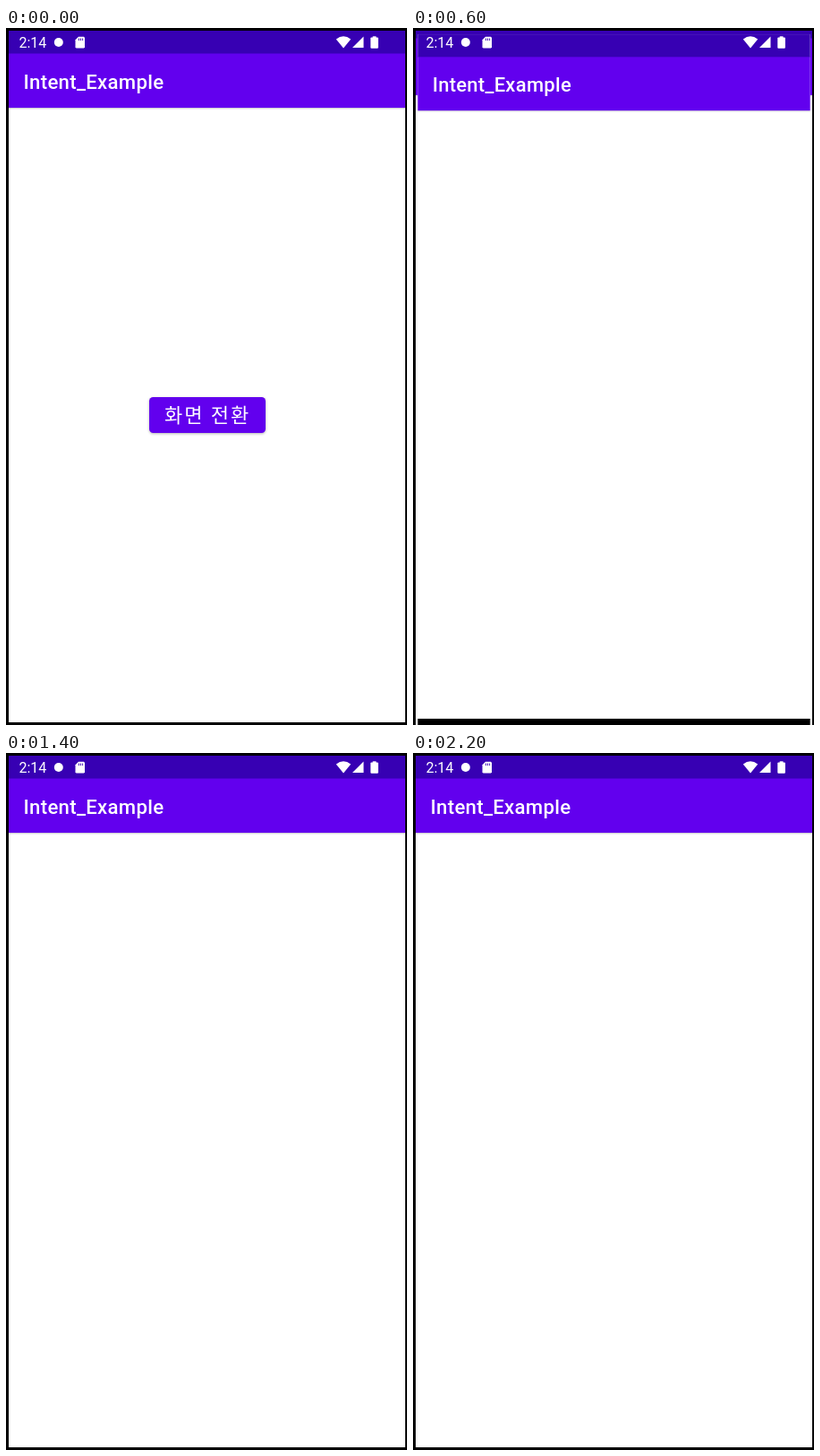
Animation of 448x778 px, one loop 2.3 s. Source, as an HTML page with a canvas:

```html
<!DOCTYPE html>
<html lang="ko">
<head>
<meta charset="utf-8">
<title>Intent_Example</title>
<style>
html, body { margin: 0; width: 100%; height: 100%; overflow: hidden; background: #000; }
canvas { display: block; }
</style>
</head>
<body>
<canvas id="stage" width="448" height="778"></canvas>
<script>
const W = 448, H = 778, LOOP = 2300, STEP = 100;
const PRESS = 400, OPEN = 500, SETTLED = 900;
const PURPLE = '#6200ee', DARK = '#3700b3';
const CENTER = { x: 224.5, y: 391 };

const ctx = document.getElementById('stage').getContext('2d');
const layer = document.createElement('canvas');
layer.width = W;
layer.height = H;
const layerCtx = layer.getContext('2d');

function rect(c, color, x, y, w, h) {
  c.fillStyle = color;
  c.fillRect(x, y, w, h);
}

function polygon(c, points) {
  c.beginPath();
  points.forEach(([x, y]) => c.lineTo(x, y));
  c.closePath();
  c.fill();
}

function roundRect(c, x, y, w, h, r) {
  c.beginPath();
  c.roundRect(x, y, w, h, r);
  c.fill();
}

function text(c, str, x, y, font, spacing) {
  c.font = font;
  c.letterSpacing = spacing + 'px';
  c.fillStyle = '#fff';
  c.fillText(str, x, y);
}

function drawButton(c, pressed) {
  c.save();
  c.shadowColor = pressed ? 'rgba(0,0,0,.38)' : 'rgba(0,0,0,.3)';
  c.shadowBlur = pressed ? 4 : 3;
  c.shadowOffsetY = pressed ? 1.5 : 1;
  c.fillStyle = PURPLE;
  roundRect(c, 160, 412, 130, 40, 4.5);
  c.restore();
  text(c, '화면 전환', 177, 440.3, '22px "Noto Sans CJK KR", "Noto Sans CJK", sans-serif', 2.1);
}

function drawScreen(c, scale, hasButton, pressed) {
  c.save();
  c.translate(CENTER.x, CENTER.y);
  c.scale(scale, scale);
  c.translate(-CENTER.x, -CENTER.y);
  rect(c, '#fff', 3, 3, 443, 772);
  rect(c, '#000', 3, 775, 443, 17);
  rect(c, '#d2d2d6', 3, 89, 443, 1);
  rect(c, '#f1f1f3', 3, 90, 443, 1);
  rect(c, PURPLE, 3, 28, 443, 61);
  rect(c, DARK, 3, 3, 443, 25.5);
  text(c, 'Intent_Example', 19.5, 67.5, '500 22.2px Roboto, sans-serif', 0.3);
  if (hasButton) drawButton(c, pressed);
  c.restore();
}

function drawStatus(c) {
  text(c, '2:14', 14.5, 22, '16px Roboto, sans-serif', 0);

  c.beginPath();
  c.arc(58.8, 16, 5, 0, Math.PI * 2);
  c.fill();

  // memory card with contact slits
  polygon(c, [[81, 9.7], [87, 9.7], [88, 10.7], [88, 21.5], [87, 22.5], [78.5, 22.5], [77.5, 21.5], [77.5, 13.2]]);
  for (let i = 0; i < 3; i++) rect(c, DARK, 81 + i * 2.1, 11.5, 0.9, 2.6);

  // wifi
  c.fillStyle = '#fff';
  c.beginPath();
  c.moveTo(377, 22.5);
  c.lineTo(368.8, 12.6);
  c.quadraticCurveTo(377, 6, 385.2, 12.6);
  c.closePath();
  c.fill();

  // signal
  polygon(c, [[387, 22], [399.5, 22], [399.5, 9.5]]);

  // battery
  roundRect(c, 407.3, 10.5, 8.6, 12.2, 1);
  c.fillRect(409.7, 9.3, 3.8, 2);
}

function drawTransition(t) {
  const n = Math.floor((t - OPEN) / STEP);
  const decay = 5 ** -n;
  drawScreen(ctx, 1.05 - 0.0165 * decay, true, false);
  layerCtx.clearRect(0, 0, W, H);
  drawScreen(layerCtx, 1 - 0.0525 * decay, false, false);
  ctx.globalAlpha = n === 0 ? 0.62 : 1;
  ctx.drawImage(layer, 0, 0);
  ctx.globalAlpha = 1;
}

function render(t) {
  rect(ctx, '#000', 0, 0, W, H);
  ctx.save();
  ctx.beginPath();
  ctx.rect(3, 3, 443, 775);
  ctx.clip();
  if (t < OPEN) drawScreen(ctx, 1, true, t >= PRESS);
  else if (t < SETTLED) drawTransition(t);
  else drawScreen(ctx, 1, false, false);
  drawStatus(ctx);
  ctx.restore();
}

const start = performance.now();
function tick() {
  render((performance.now() - start) % LOOP);
  requestAnimationFrame(tick);
}
tick();
</script>
</body>
</html>
```
